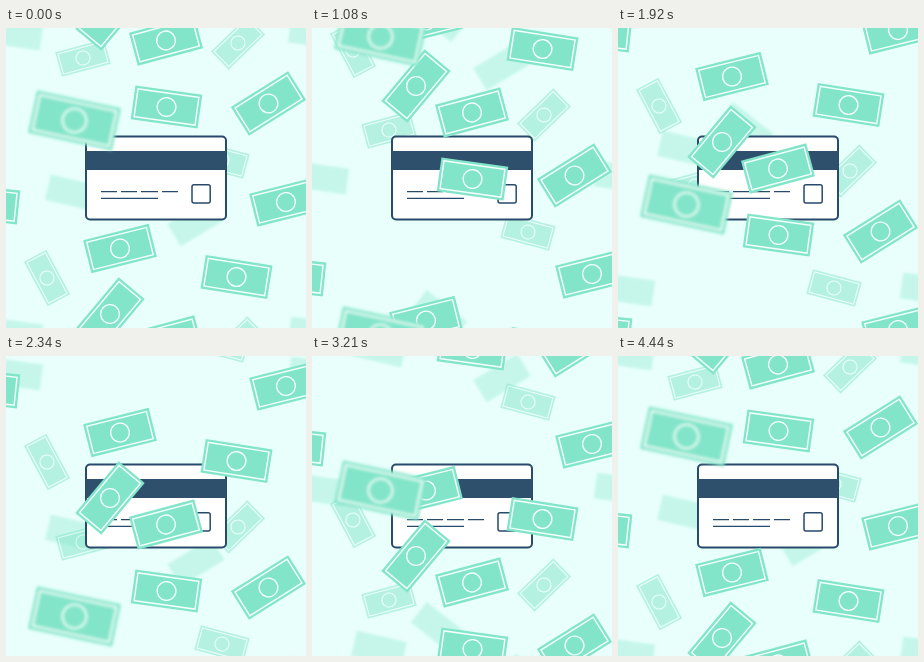
Write an HTML page that moves like this. It is 300 px wide and 300 px high and loops after 4500 ms.

```html
<!DOCTYPE html>
<html lang="en">
<head>
<meta charset="utf-8">
<title>Falling bills</title>
<style>
  html, body { margin: 0; width: 100%; height: 100%; overflow: hidden; background: #e8fffb; }
  svg { display: block; width: 100vw; height: 100vh; }
</style>
</head>
<body>
<svg viewBox="0 0 300 300">
  <defs>
    <filter id="blur" x="-20%" y="-30%" width="140%" height="160%"><feGaussianBlur stdDeviation="1.4"/></filter>
    <g id="bill">
      <rect x="-33.75" y="-17" width="67.5" height="34" fill="#82e5c9"/>
      <g class="lines" fill="none" stroke="#f4fffc" stroke-width="1.4">
        <rect x="-30.75" y="-14" width="61.5" height="28"/>
        <circle r="9.4"/>
      </g>
    </g>
    <g id="plain"><rect x="-33.75" y="-17" width="67.5" height="34" fill="#82e5c9"/></g>
  </defs>
  <rect width="300" height="300" fill="#e8fffb"/>
  <g id="far"></g>
  <g id="back"></g>
  <g fill="none" stroke="#284a6b">
    <rect x="80" y="108.5" width="140" height="83" rx="4" fill="#fff" stroke-width="2"/>
    <rect x="80" y="123" width="140" height="19" fill="#2f506d" stroke="none"/>
    <path d="M95 163.6h16m4 0h16m4 0h17m4 0h16M95 170.3h57" stroke-width="1.3"/>
    <rect x="186" y="156.7" width="18.2" height="18.2" rx="2" stroke-width="1.5"/>
  </g>
  <g id="mid"></g>
  <g id="near"></g>
</svg>
<script>
const NS = 'http://www.w3.org/2000/svg';
const LOOP = 4500, STEP = 30, TILE = 300;

// turns: stage heights fallen per loop; bills: [centre x, centre y, tilt]
const layers = [
  { id: 'far', turns: 2, scale: 0.76, alpha: 0.33, blur: true, shape: 'plain',
    bills: [[10, 6, 8], [309, 5, 8], [67, 165, 13], [127, 144, 38], [190, 194, -31]] },
  { id: 'back', turns: 1, scale: 0.75, alpha: 0.5, shape: 'bill',
    bills: [[77, 30, -15], [232, 15, -44], [216, 132, 15], [41, 250, 62]] },
  { id: 'mid', turns: 1, scale: 1, alpha: 1, shape: 'bill',
    bills: [[160.5, 79, 8], [160, 12.5, -15], [262.5, 75.5, -32], [280, 174, -14],
            [114, 220.5, -14], [230.5, 249, 9], [104, 286, -50], [-21, 176, 6]] },
  { id: 'near', turns: 3, scale: 1.27, alpha: 1, blur: true, shape: 'bill',
    bills: [[68.5, 92.5, 12]] }
];

function add(parent, tag, attrs) {
  const el = document.createElementNS(NS, tag);
  for (const k in attrs) el.setAttribute(k, attrs[k]);
  return parent.appendChild(el);
}

// Each layer is one tile stacked so that it falls without a seam
for (const l of layers) {
  l.el = document.getElementById(l.id);
  for (let row = -2; row <= 1; row++)
    for (const [x, y, tilt] of l.bills) {
      const place = `translate(${x} ${y + row * TILE}) rotate(${tilt}) scale(${l.scale})`;
      const bill = add(l.el, 'use', { href: '#' + l.shape, transform: place, opacity: l.alpha });
      if (l.blur) bill.setAttribute('filter', 'url(#blur)');
    }
}

function render(ms) {
  const t = Math.min(Math.floor((ms % LOOP) / STEP) * STEP, LOOP - 2 * STEP);
  for (const l of layers) {
    const y = (t / LOOP * l.turns * TILE) % TILE;
    l.el.setAttribute('transform', `translate(0 ${y.toFixed(2)})`);
  }
}

const start = performance.now();
function tick() {
  render(performance.now() - start);
  requestAnimationFrame(tick);
}
render(0);
requestAnimationFrame(tick);
</script>
</body>
</html>
```
